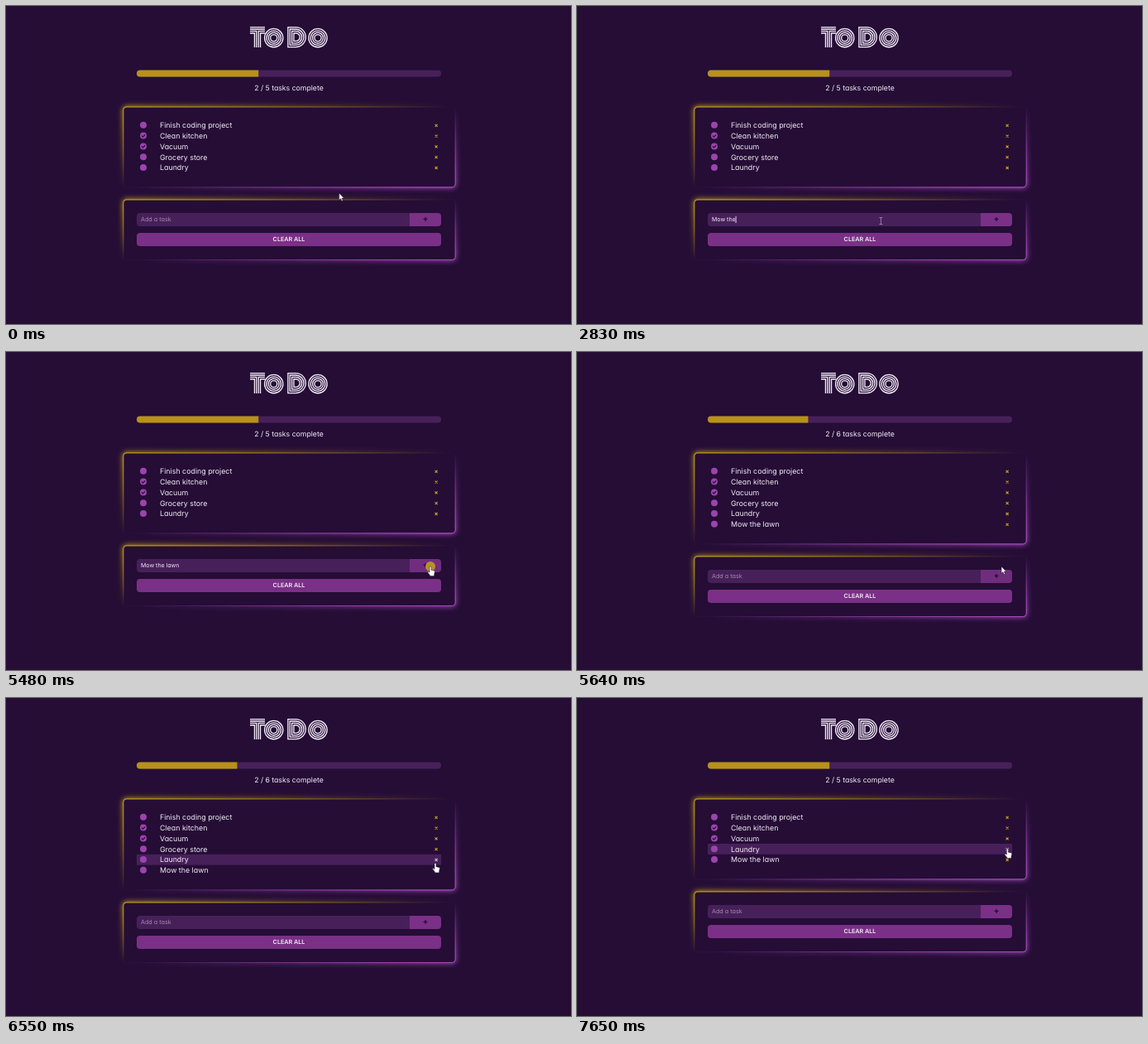
Write an HTML page that moves like this. It is 683x384 px and loops after 8000 ms.

```html
<!DOCTYPE html>
<html lang="en">
<head>
<meta charset="utf-8">
<title>ToDo</title>
<style>
  html, body { margin: 0; width: 100%; height: 100%; overflow: hidden; background: #250d36; }
  svg { display: block; width: 683px; height: 384px; }
  text {
    font-family: Inter, Lato, sans-serif;
    font-feature-settings: "cv11";
    font-size: 8.85px;
    fill: #f4ecf7;
    white-space: pre;
    text-rendering: geometricPrecision;
  }
  .count { font-size: 8.7px; text-anchor: middle; }
  .entry { font-size: 7px; }
  .hint { font-size: 7.2px; fill: #a08aac; }
  .clear { font-size: 7.2px; font-weight: 600; text-anchor: middle; }
  .gold { fill: #b89218; }
  .field { fill: #47205a; }
  .button { fill: #7a3086; }
  .button.hover { fill: #712d7d; }
  .disc { fill: #9b44ae; }
  .tick { fill: none; stroke: #250d36; stroke-width: 1.2; }
  .cross { stroke: #c3a01c; stroke-width: 1.1; }
  .hover .cross { stroke: #c9b4cf; }
  .row rect { fill: none; }
  .row.hover rect { fill: #47205a; }
  .pointer { fill: #fff; stroke: #1b0a28; stroke-width: .5; }
</style>
</head>
<body>
<svg id="stage" viewBox="0 0 683 384">
  <defs>
    <linearGradient id="edge" x1="0" y1="0" x2="1" y2="1">
      <stop offset="0" stop-color="#bd991a"/>
      <stop offset=".5" stop-color="#bd991a" stop-opacity="0"/>
      <stop offset=".5" stop-color="#a54cb9" stop-opacity="0"/>
      <stop offset="1" stop-color="#a54cb9"/>
    </linearGradient>
    <filter id="blur" x="-10%" y="-30%" width="120%" height="160%">
      <feGaussianBlur stdDeviation="3.3"/>
    </filter>
    <clipPath id="barClip"><rect x="158" y="77.6" width="368" height="8" rx="4"/></clipPath>
  </defs>

  <g id="title" fill="none" role="img" aria-label="ToDo"></g>

  <g clip-path="url(#barClip)">
    <rect class="field" x="158" y="77" width="368" height="9"/>
    <rect class="gold" id="bar" x="158" y="77" height="9"/>
  </g>
  <text class="count" id="count" x="342" y="102"></text>

  <g id="listCard"></g>
  <g id="rows"></g>

  <g id="form">
    <g id="formCard"></g>
    <rect class="field" x="158" y="250" width="340" height="16" rx="4"/>
    <path id="add" class="button" d="M488 250h34a4 4 0 0 1 4 4v8a4 4 0 0 1-4 4h-34z"/>
    <path d="M504.5 257.4h5M507 254.9v5" stroke="#250d36" stroke-width="1.3"/>
    <text class="hint" id="hint" x="163" y="260.3">Add a task</text>
    <text class="entry" id="entry" x="163" y="260.3"></text>
    <rect id="caret" y="254" width=".9" height="8" fill="#f4ecf7"/>
    <rect class="button" x="158" y="274" width="368" height="16" rx="4"/>
    <text class="clear" x="342" y="284.4">CLEAR ALL</text>
  </g>

  <circle id="press" r="6" fill="#c8a818" opacity=".82"/>
  <g id="cursor">
    <path id="arrow" class="pointer" d="M0 0V8.3L1.9 6.6L3.2 9.6L4.6 9L3.3 6.1H5.8Z"/>
    <path id="hand" class="pointer" d="M-1 .9a1 1 0 0 1 2 0V4.2L4.4 4.9Q5.5 5.3 5.4 6.5L4.7 9.3V11.4H-.6V10.4L-3.2 7.2Q-3.4 5.8-2.1 6.1L-1 7.2Z"/>
    <path id="beam" d="M-2-4H2M0-4V4M-2 4H2" fill="none" stroke="#b39fbb" stroke-width=".7"/>
  </g>
</svg>
<script>
const LOOP = 8000, PITCH = 12.8;
const $ = id => document.getElementById(id);
const show = (el, on) => el.setAttribute('visibility', on ? 'visible' : 'hidden');

// Inline lettering: one skeleton, stroked in nested widths
const ring = x => `M${x - 7.6} 38.6a7.6 7.6 0 1 0 15.2 0a7.6 7.6 0 1 0-15.2 0Z`;
const letters = 'M295 29.2H313M304 29.2V50' + ring(323.7) +
  'M344.4 29.2H350.4A8.4 8.4 0 0 1 350.4 46H344.4Z' + ring(377);
$('title').innerHTML = [8.4, 5.8, 3.7, 1.1].map((w, i) =>
  `<path d="${letters}" stroke="${i % 2 ? '#250d36' : '#f6eefa'}" stroke-width="${w}"/>`).join('');

const INSETS = [-1.2, -.8, .4];
function makeCard(host, y) {
  const looks = ['fill="url(#edge)" filter="url(#blur)"', 'fill="url(#edge)"', 'fill="#250d36"'];
  host.innerHTML = INSETS.map((d, i) =>
    `<rect x="${142 + d}" y="${y + d}" width="${401 - 2 * d}" rx="${4 - d}" ${looks[i]}/>`).join('');
  return h => [...host.children].forEach((el, i) => el.setAttribute('height', h - 2 * INSETS[i]));
}
const sizeList = makeCard($('listCard'), 122);
makeCard($('formCard'), 234)(72.3);

const base = ['Finish coding project', 'Clean kitchen', 'Vacuum', 'Grocery store', 'Laundry'];
const done = ['Clean kitchen', 'Vacuum'];
const added = 'Mow the lawn';
const lists = [
  [0, base],
  [5640, [...base, added]],
  [7650, [...base.filter(s => s !== 'Grocery store'), added]]
];

// time, shape, x, y
const moves = [
  [0, 'arrow', 402.7, 226], [180, 'arrow', 376, 245], [330, 'beam', 367.4, 259.5],
  [4690, 'beam', 392, 259], [4845, 'beam', 447, 257], [5000, 'hand', 502, 257],
  [5160, 'hand', 513, 259], [5640, 'arrow', 513, 259],
  [6090, 'arrow', 514, 248], [6250, 'arrow', 516, 224], [6400, 'hand', 518, 207],
  [6550, 'hand', 519, 199.5], [6720, 'hand', 519.5, 195], [6890, 'hand', 520, 189.5],
  [7060, 'hand', 520.3, 182]
];
const presses = [[930, 1110], [5480, 5640], [7480, 7650]];

// time, typed letters
const typing = [[0, 0], [2185, 1], [2340, 2], [2495, 4], [2650, 5], [2805, 7],
  [2960, 9], [3130, 10], [3293, 11], [3457, 12], [5640, 0]];
// time, caret visible
const blinks = [[0, 0], [1110, 1], [1560, 0], [2030, 1], [3620, 0], [4080, 1], [4530, 0]];

const at = (steps, t) => steps.findLast(s => s[0] <= t);

function rowMarkup(name, i) {
  const y = 144 + PITCH * i;
  const tick = done.includes(name) ? '<path class="tick" d="M-2 .1L-.5 1.6L2.2-1.3"/>' : '';
  return `<g class="row" transform="translate(0 ${y})">
    <rect x="158" y="-6.4" width="368" height="${PITCH}"/>
    <g transform="translate(166 -.2)"><circle class="disc" r="4"/>${tick}</g>
    <text x="186" y="3.1">${name}</text>
    <path class="cross" d="M518.6-1.2l3 3m0-3l-3 3"/></g>`;
}

let current;
function setList(items) {
  if (items === current) return;
  current = items;
  const n = items.length, extra = Math.round((n - 5) * PITCH);
  const percent = Math.floor(100 * done.length / n);
  $('rows').innerHTML = items.map(rowMarkup).join('');
  $('count').textContent = `${done.length} / ${n} tasks complete`;
  $('bar').setAttribute('width', 3.68 * percent);
  sizeList(96.6 + extra);
  $('form').setAttribute('transform', `translate(0 ${extra})`);
}

function draw(t) {
  setList(at(lists, t)[1]);

  const [, shape, x, y] = at(moves, t);
  for (const id of ['arrow', 'hand', 'beam']) show($(id), id === shape);
  $('cursor').setAttribute('transform', `translate(${x} ${y})`);
  $('press').setAttribute('cx', x);
  $('press').setAttribute('cy', y);
  show($('press'), presses.some(([a, b]) => t >= a && t < b));

  const over = Math.floor((y - 137.6) / PITCH);
  [...$('rows').children].forEach((row, i) => row.classList.toggle('hover', i === over));
  $('add').classList.toggle('hover', x > 488 && y > 250);

  const typed = added.slice(0, at(typing, t)[1]);
  if ($('entry').textContent !== typed) $('entry').textContent = typed;
  show($('hint'), !typed);
  show($('caret'), at(blinks, t)[1]);
  $('caret').setAttribute('x', 163 + (typed ? $('entry').getComputedTextLength() : 0));
}

const start = performance.now();
function tick() {
  draw((performance.now() - start) % LOOP);
  requestAnimationFrame(tick);
}
tick();
</script>
</body>
</html>
```
